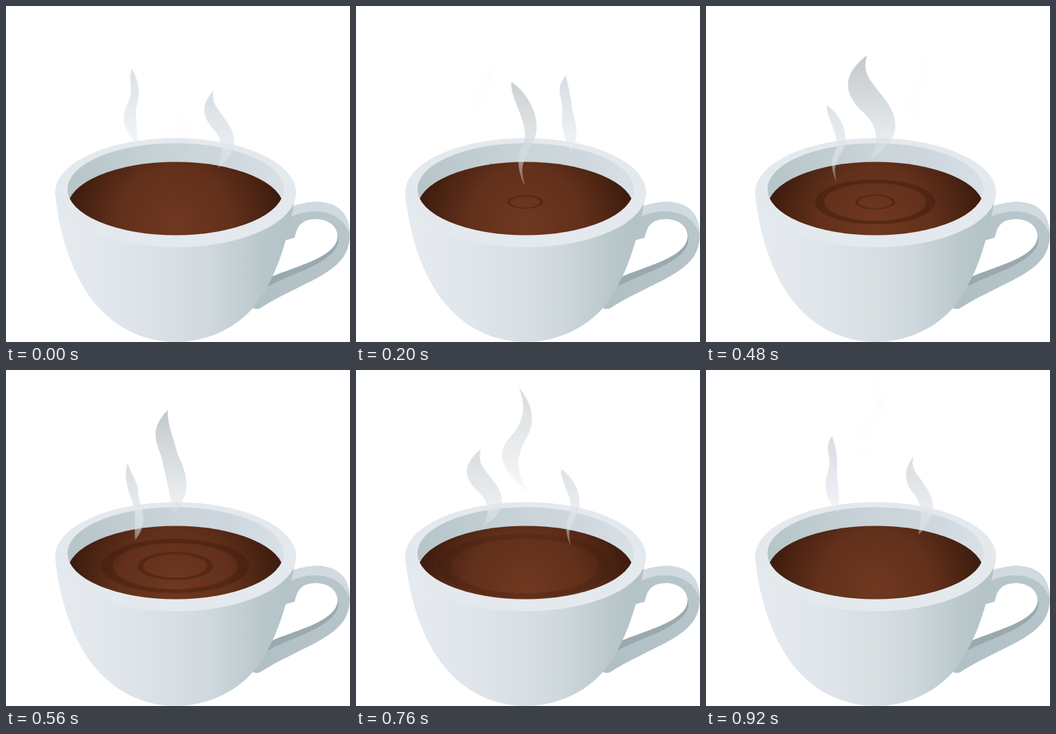
An HTML page without scripts for the animation above (960 ms loop, 498 by 486 pixels).

```html
<!DOCTYPE html>
<html lang="en">
<head>
<meta charset="utf-8">
<title>Coffee</title>
<style>
html, body { margin: 0; height: 100%; overflow: hidden; background: #fff; }
svg { display: block; width: 498px; height: 486px; }

/* Each wisp runs the same cycle, shifted by --phase; motion steps every 40 ms. */
.wisp {
  animation: rise 960ms infinite, fade 960ms linear infinite;
  animation-delay: calc(var(--phase) * -1ms - 2ms);
}
@keyframes rise {
  0% {
    transform: translateY(140px); animation-timing-function: steps(3);
    d: path("M-6 0C20 8 42 38 18 74S-6 112 12 152C-8 134 -30 104 -6 76S10 12 -6 0Z");
  }
  12.5% {
    transform: translateY(122px); animation-timing-function: steps(2);
    d: path("M-11 0C14 12 34 42 15 78S2 120 7 152C-2 136 -18 108 -4 82S4 16 -11 0Z");
  }
  20.8333% {
    transform: translateY(110px); animation-timing-function: steps(3);
    d: path("M-15 0C10 16 34 58 14 92S2 132 4 150C-4 132 -10 112 2 88S-18 24 -15 0Z");
  }
  33.3333% {
    transform: translateY(91px); animation-timing-function: steps(4);
    d: path("M-12 0C-17 26 -4 30 5 46S50 100 0 152C0 128 12 96 -8 70S-24 24 -12 0Z");
  }
  50% {
    transform: translateY(71px); animation-timing-function: steps(4);
    d: path("M-7 0C-14 24 -4 34 8 50S66 110 -3 151C12 126 9 102 -13 82S-50 34 -7 0Z");
  }
  66.6667% {
    transform: translateY(45px); animation-timing-function: steps(3);
    d: path("M-5 0C2 20 7 40 5 64S14 112 6 151C-14 124 -24 104 -13 70S-24 30 -5 0Z");
  }
  79.1667% {
    transform: translateY(26px); animation-timing-function: steps(5);
    d: path("M-4 0C10 16 24 42 7 72S-8 118 9 151C-24 124 -42 98 -16 70S2 16 -4 0Z");
  }
  100% {
    transform: translateY(-4px);
    d: path("M2 0C18 16 30 42 11 72S-6 118 12 151C-22 124 -36 98 -10 70S8 16 2 0Z");
  }
}
@keyframes fade {
  0%, 100% { opacity: 0; }
  12.5% { opacity: .5; }
  25%, 68% { opacity: 1; }
  79.1667% { opacity: .65; }
  92% { opacity: .05; }
}

.ring {
  fill: none; stroke: #3a1a0c; stroke-width: 15;
  animation: 960ms -2ms infinite;
}
.outer { animation-name: spread-outer; }
.inner { animation-name: spread-inner; }
@keyframes spread-outer {
  0%, 8.3333% { transform: scale(0); opacity: .45; animation-timing-function: steps(6); }
  33.3333% { transform: scale(.52); opacity: .45; animation-timing-function: steps(4); }
  50% { transform: scale(.87); opacity: .45; animation-timing-function: steps(4); }
  66.6667% { transform: scale(1.26); opacity: .35; animation-timing-function: steps(3); }
  79.1667%, 100% { transform: scale(1.5); opacity: 0; }
}
@keyframes spread-inner {
  0%, 20.8333% { transform: scale(0); opacity: .45; animation-timing-function: steps(3); }
  33.3333% { transform: scale(.14); opacity: .45; animation-timing-function: steps(4); }
  50% { transform: scale(.29); opacity: .45; animation-timing-function: steps(4); }
  66.6667% { transform: scale(.8); opacity: .42; animation-timing-function: steps(3); }
  79.1667% { transform: scale(1.26); opacity: .22; animation-timing-function: steps(3); }
  91.6667%, 100% { transform: scale(1.5); opacity: 0; }
}
</style>
</head>
<body>
<svg viewBox="0 0 498 486">
  <defs>
    <linearGradient id="body">
      <stop stop-color="#e6ebf0"/>
      <stop offset=".3" stop-color="#dfe5ea"/>
      <stop offset=".5" stop-color="#d7dfe2"/>
      <stop offset=".65" stop-color="#ced8de"/>
      <stop offset=".85" stop-color="#bac8cb"/>
      <stop offset="1" stop-color="#b2c1c6"/>
    </linearGradient>
    <linearGradient id="wall">
      <stop stop-color="#b6c5c8"/>
      <stop offset=".5" stop-color="#c9d4d9"/>
      <stop offset=".75" stop-color="#ced7de"/>
      <stop offset="1" stop-color="#d9e1e6"/>
    </linearGradient>
    <linearGradient id="handle" x1="1" y1="0" x2=".2" y2="1">
      <stop stop-color="#b9c7cc"/>
      <stop offset="1" stop-color="#b1c0c5"/>
    </linearGradient>
    <radialGradient id="coffee" gradientUnits="userSpaceOnUse" cx="245" cy="315" r="165">
      <stop stop-color="#703820"/>
      <stop offset=".5" stop-color="#62301b"/>
      <stop offset="1" stop-color="#38190b"/>
    </radialGradient>
    <linearGradient id="dense" x2="0" y2="1">
      <stop stop-color="#bfc5c8" stop-opacity=".95"/>
      <stop offset=".6" stop-color="#d5dbde" stop-opacity=".8"/>
      <stop offset="1" stop-color="#dfe4e8" stop-opacity=".4"/>
    </linearGradient>
    <linearGradient id="light" x2="0" y2="1">
      <stop stop-color="#d6dbe0" stop-opacity=".95"/>
      <stop offset=".6" stop-color="#e1e6eb" stop-opacity=".8"/>
      <stop offset="1" stop-color="#e3e8ed" stop-opacity=".4"/>
    </linearGradient>
    <clipPath id="mouth"><ellipse cx="245.5" cy="265" rx="156.5" ry="66.5"/></clipPath>
    <clipPath id="surface" clip-path="url(#mouth)"><ellipse cx="245.5" cy="292" rx="156.5" ry="66.5"/></clipPath>
  </defs>

  <!-- handle -->
  <path fill="url(#handle)" d="M412 291C446 278 482 281 493 307C500 324 499 343 492 357C476 390 418 405 368 437Q362 440 356 436L384 392C420 376 482 363 480 333C479 313 458 306 440 309C424 312 421 323 418 335L404 339Z"/>
  <path fill="#d0dadf" d="M412 291C446 278 482 281 493 307Q497 317 497 330C490 308 472 297 446 297Q430 297 412 305Z"/>
  <path fill="#9aa9ae" d="M384 392C420 376 482 363 480 331Q484 343 475 354C456 377 412 388 378 406Z"/>

  <!-- cup -->
  <path fill="url(#body)" d="M71 268C76 330 97 395 133 435C163 469 204 486 245.500 486C287 486 330 469 359 435C392 393 408 340 420 268Z"/>
  <ellipse cx="245.500" cy="270" rx="174.500" ry="79" fill="#e4e9ee"/>
  <ellipse cx="245.500" cy="265" rx="156.500" ry="66.500" fill="url(#wall)"/>

  <!-- coffee and ripples -->
  <g clip-path="url(#surface)">
    <rect x="85" y="220" width="322" height="115" fill="url(#coffee)"/>
    <g transform="translate(245 283.500) scale(1 .37)">
      <circle class="ring outer" r="92.500"/>
      <circle class="ring inner" r="92.500"/>
    </g>
  </g>

  <!-- steam -->
  <g transform="translate(186 62) scale(.74)"><path class="wisp" style="--phase:680" fill="url(#light)"/></g>
  <g transform="translate(240)"><path class="wisp" style="--phase:0" fill="url(#dense)"/></g>
  <g transform="translate(308 62) scale(.74)"><path class="wisp" style="--phase:400" fill="url(#light)"/></g>
</svg>
</body>
</html>
```
